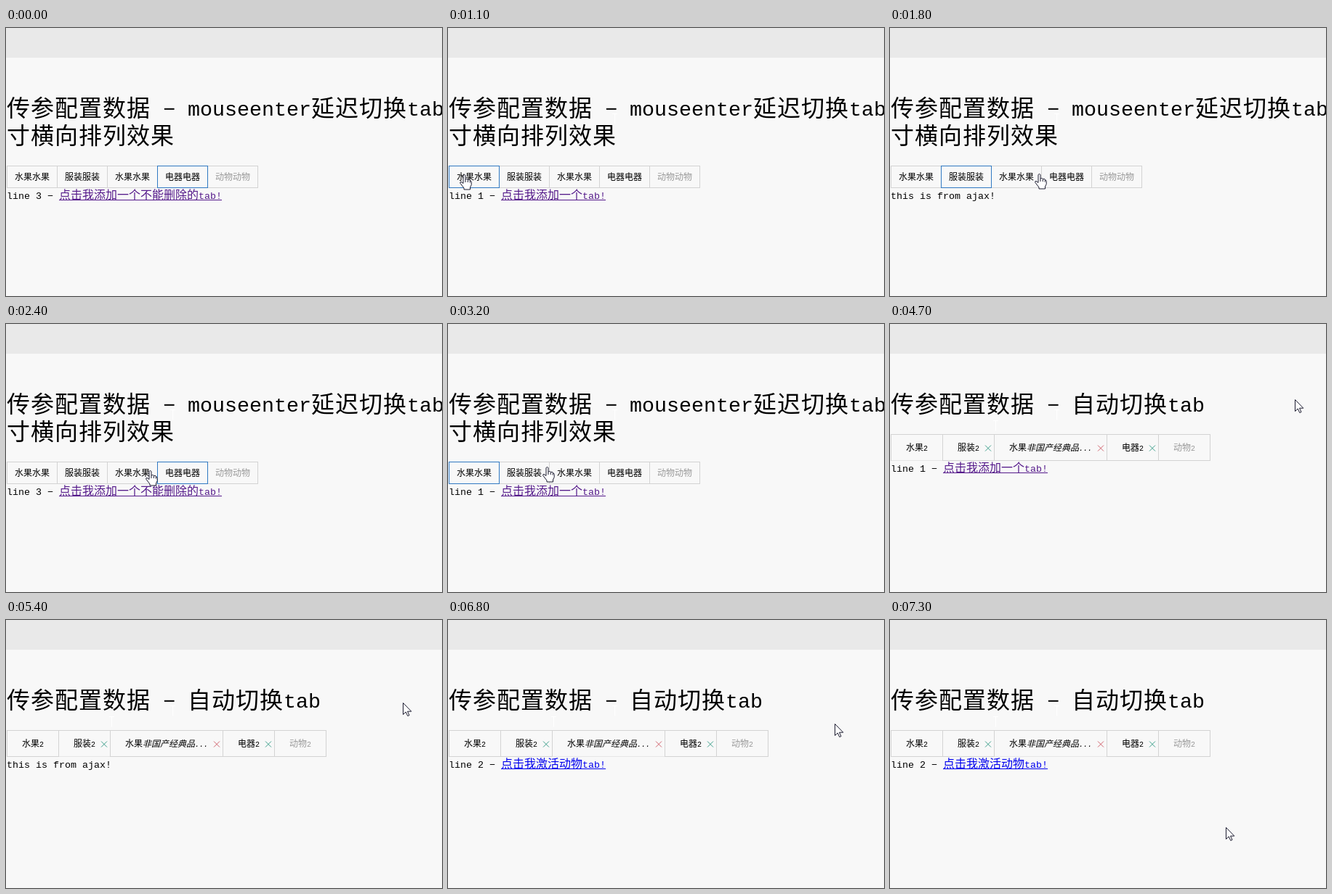
An HTML page for the animation above (8 s loop, 600 px wide and 370 px high).

```html
<!DOCTYPE html>
<html lang="zh-CN">
<head>
<meta charset="utf-8">
<title>tab</title>
<style>
  html, body { margin: 0; width: 100%; height: 100%; overflow: hidden; background: #f8f8f8; }
  svg { display: block; width: 600px; height: 370px; }
  text { white-space: pre; font-family: "Noto Sans CJK SC", "Noto Sans CJK", sans-serif; font-weight: 400; }
  .en { font-family: "Liberation Mono", monospace; letter-spacing: 0; }
  .title { letter-spacing: 1px; }
  .line { font-weight: 300; }
  .box, .close { fill: none; stroke-width: 1px; }
  .box, .rule { shape-rendering: crispEdges; }
  .ghost { fill: none; stroke: #fff; }
  .cursor { fill: #fff; stroke: #1c1c30; stroke-width: 1px; stroke-linejoin: round; }
</style>
</head>
<body>
<svg id="stage" viewBox="0 0 600 370">
  <rect width="600" height="370" fill="#f8f8f8"/>
  <rect width="600" height="41" fill="#e9e9e9"/>
</svg>
<script>
const LOOP = 8000, STEP = 100, SWAP = 4700;
const VISITED = '#551a8b', LINK = '#0000ee', GREY = '#d3d3d3';
const stage = document.getElementById('stage');

function add(parent, tag, attrs = {}) {
  const node = document.createElementNS('http://www.w3.org/2000/svg', tag);
  for (const key in attrs) node.setAttribute(key, attrs[key]);
  parent.append(node);
  return node;
}

const group = () => add(stage, 'g');
const show = (node, on) => node.setAttribute('visibility', on ? 'visible' : 'hidden');

// Latin letters are half as wide as Chinese ones, in a 0.6em monospace.
function write(parent, str, x, y, size, attrs = {}) {
  const text = add(parent, 'text', { x, y, 'font-size': size, ...attrs });
  const gap = attrs.class === 'title' ? 1 : 0;
  for (const run of str.match(/[\x00-\x7f]+|[^\x00-\x7f]+/g)) {
    const latin = run.charCodeAt(0) < 128;
    const style = latin ? { class: 'en', y: y - gap, 'font-size': (size / 2 + gap) / .6 } : { y };
    // The minus sign has the wide dash these lines need.
    add(text, 'tspan', style).textContent = run.replace('-', '\u2212');
  }
}

function title(parent, str, y) {
  write(parent, str, 1, y, 32, { class: 'title' });
}

function widthOf(str, size) {
  return [...str].reduce((sum, c) => sum + (c.charCodeAt(0) < 128 ? size / 2 : size), 0);
}

function line(y, lead, link = '', color = VISITED) {
  const g = group();
  write(g, lead, 1, y, 16);
  if (link) {
    const x = 1 + widthOf(lead, 16);
    write(g, link, x, y, 16, { fill: color, class: 'line' });
    add(g, 'rect', { class: 'rule', x, y: y + 1, width: widthOf(link, 16), height: 1, fill: color });
  }
  return g;
}

function frame(parent, left, right, top, bottom, stroke) {
  return add(parent, 'rect', { class: 'box', x: left + .5, y: top + .5, width: right - left, height: bottom - top, stroke });
}

function cross(parent, x, y, stroke) {
  add(parent, 'path', { class: 'close', stroke, d: `M${x - 4} ${y - 4}l8 8m0 -8l-8 8` });
}

// First page: hover tabs
const first = group();
title(first, '传参配置数据 - mouseenter延迟切换tab', 122);
title(first, '寸横向排列效果', 160);
['水果水果', '服装服装', '水果水果', '电器电器', '动物动物'].forEach((label, i) => {
  const x = 1 + 69 * i;
  frame(first, x, x + 69, 190, 220, GREY);
  write(first, label, x + 11, 210, 12, { fill: i === 4 ? '#999' : '#000' });
});
const active = frame(first, 1, 70, 190, 220, '#3079c2');
const firstLines = {
  1: line(236, 'line 1 - ', '点击我添加一个tab!'),
  2: line(236, 'this is from ajax!'),
  4: line(236, 'line 3 - ', '点击我添加一个不能删除的tab!')
};

// Second page: automatic tabs
const second = group();
const edges = [1, 72, 143, 298, 369, 440];
title(second, '传参配置数据 - 自动切换tab', 122);
['水果2', '服装2', '水果', '电器2', '动物2'].forEach((label, i) => {
  frame(second, edges[i], edges[i + 1], 152, 188, GREY);
  write(second, label, edges[i] + 21, 175, 12, { fill: i === 4 ? '#999' : '#000' });
});
write(second, '非国产经典品...', 188, 175, 12, { 'font-style': 'italic' });
cross(second, 135, 171.5, '#3fa08c');
cross(second, 290, 171.5, '#d2646e');
cross(second, 361, 171.5, '#3fa08c');
const openEdge = add(second, 'rect', { class: 'rule', y: 188, height: 1, fill: '#e6e6e6' });
const secondLines = {
  1: line(204, 'line 1 - ', '点击我添加一个tab!'),
  2: line(204, 'this is from ajax!'),
  3: line(204, 'line 2 - ', '点击我激活动物tab!', LINK)
};

// Faint pointer trails
const beam = (x, y) => add(stage, 'path', { class: 'ghost', d: `M${x - 3} ${y + .5}h7m-3.5 0v14` });
const trail = beam(229, 118), trailLow = beam(145, 133);

const cursors = {
  hand: 'M5 1.5Q6.5 -.5 8 1.5V7L9.5 6.5Q11 6.3 11.5 7.5L13 7.3Q14.3 7.5 14.5 8.8Q16.2 8.8 16.2 10.5V14.5L14.5 18V21H6V19L1 12.5Q0 10.5 2 10.3L5 12.5ZM8 7V11M11.3 7.5V11M14.3 8.8V11.5',
  arrow: 'M.5 .5V16.5L4.2 13L6.8 18.5L9 17.5L6.5 12.2H11.8Z'
};
const cursor = add(stage, 'path', { class: 'cursor' });

// [time, x, y] of the pointer's top left corner
const path = [
  [100, 226, 118], [500, 0, 195], [600, 0, 195], [800, 6, 198], [1000, 6, 198],
  [1100, 16, 202], [1500, 122, 200], [1600, 122, 200], [1800, 199, 201], [2100, 232, 202],
  [2300, 232, 202], [2800, 30, 200], [3100, 30, 200], [3200, 130, 197], [3500, 222, 200],
  [3700, 262, 198], [4000, 400, 166], [4699, 400, 166], [SWAP, 557, 104],
  [5200, 557, 104], [5400, 546, 114], [6700, 546, 114], [7300, 462, 286], [LOOP, 462, 286]
];
const firstTabs = [[0, 4], [700, 1], [1500, 2], [2100, 4], [2800, 1], [3700, 4]];
const secondTabs = [[0, 1], [4900, 2], [6000, 3]];

const at = (list, t) => list.filter(([start]) => start <= t).pop()[1];

function position(t) {
  const i = Math.max(1, path.findIndex(([time]) => time > t));
  const [t0, x0, y0] = path[i - 1], [t1, x1, y1] = path[i];
  const k = (t - t0) / (t1 - t0);
  return [Math.round(x0 + (x1 - x0) * k), Math.round(y0 + (y1 - y0) * k)];
}

function drawCursor(t) {
  show(cursor, t >= 300);
  if (t < 300) return;
  const [x, y] = position(t);
  const onTabs = t < SWAP && y > 180 && x < 277;
  cursor.setAttribute('d', onTabs ? cursors.hand : cursors.arrow);
  cursor.setAttribute('transform', `translate(${x} ${y})`);
  cursor.style.stroke = t >= 3800 && t < SWAP ? '#fff' : '';
}

function draw(t) {
  const late = t >= SWAP;
  const tab = at(firstTabs, t), auto = at(secondTabs, t);
  show(first, !late);
  show(second, late);
  active.setAttribute('x', 1.5 + 69 * (tab - 1));
  for (const key in firstLines) show(firstLines[key], !late && +key === tab);
  for (const key in secondLines) show(secondLines[key], late && +key === auto);
  openEdge.setAttribute('x', edges[auto - 1] + 1);
  openEdge.setAttribute('width', edges[auto] - edges[auto - 1] - 1);
  show(trail, t >= 100);
  show(trailLow, late);
  drawCursor(t);
}

const begin = performance.now();
function tick() {
  const t = (performance.now() - begin) % LOOP;
  draw(Math.floor(t / STEP) * STEP);
  requestAnimationFrame(tick);
}
tick();
</script>
</body>
</html>
```
